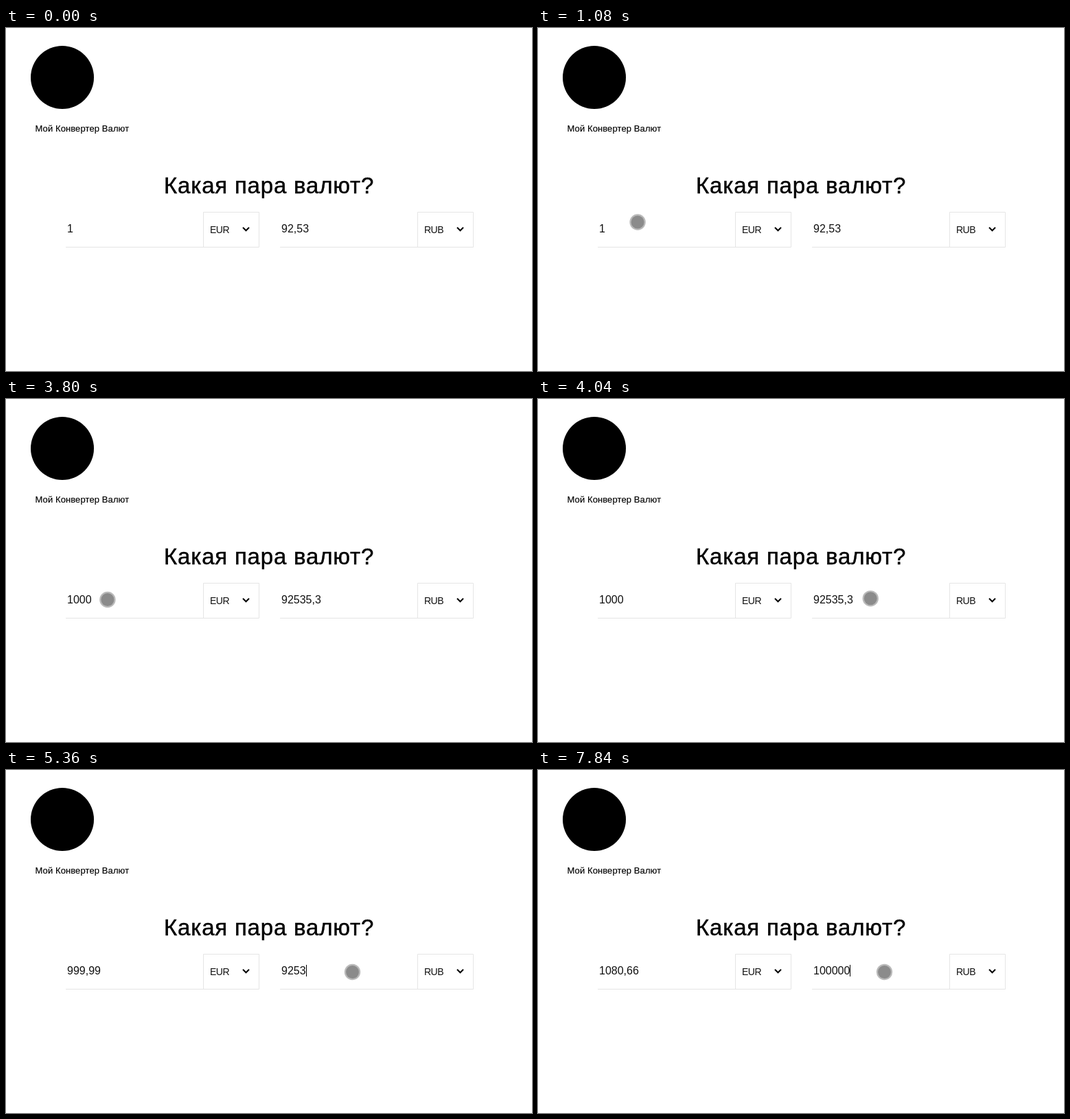
An HTML page for the animation above (8000 ms loop, 766 by 500 pixels).

```html
<!DOCTYPE html>
<html lang="ru">
<head>
<meta charset="utf-8">
<title>Конвертер</title>
<style>
  html, body { margin: 0; width: 100%; height: 100%; overflow: hidden; background: #fff; }
  svg { display: block; font: 16px "Liberation Sans", Arial, sans-serif; }
  .name { font-size: 13px; letter-spacing: .1px; stroke: #000; stroke-width: .15; }
  .title { font-size: 33px; letter-spacing: .8px; stroke: #000; stroke-width: .45; }
  .value { fill: #111; }
  .hint { fill: #d0d0d0; }
  .frame { fill: none; stroke: #e5e5e5; }
  .code { font-size: 14px; letter-spacing: -.5px; fill: #111; }
  .arrow { fill: none; stroke: #000; stroke-width: 2; }
</style>
</head>
<body>
<svg width="766" height="500" viewBox="0 0 766 500">
  <circle cx="82" cy="72" r="46"/>
  <text class="name" x="42.5" y="151">Мой Конвертер Валют</text>
  <text class="title" x="230" y="241">Какая пара валют?</text>
  <g id="fields"></g>
  <g id="pointer">
    <circle r="11.7" fill-opacity=".27"/>
    <circle r="9.5" fill-opacity=".25"/>
  </g>
</svg>
<script>
const LOOP = 8000, RATE = 92.5353, BLINK = 500, LAG = 80;
const LEFT = 0, RIGHT = 1;

// Every click or key press sets the focused field and its text.
const inputs = [];
const press = (time, field, text) => inputs.push({ time, field, text });
const type = (field, time, step, texts) =>
  texts.forEach((text, i) => press(time + i * step, field, text));
const powers = (from, to) =>
  Array.from({ length: to - from + 1 }, (_, i) => String(10 ** (from + i)));
const erase = (text, count) =>
  Array.from({ length: count }, (_, i) => text.slice(0, -1 - i));

press(1380, LEFT, '1');
press(2280, LEFT, '10');
type(LEFT, 3040, 250, powers(2, 3));
press(4720, RIGHT, '92535,3');
type(RIGHT, 5240, 55, erase('92535,3', 5));
type(RIGHT, 5800, 180, erase('92', 2));
type(RIGHT, 6480, 160, powers(0, 3));
type(RIGHT, 7520, 100, powers(4, 5));

// Pointer stops: time, x, y
const path = [
  [760, 17, 252], [1080, 145, 283], [1200, 155, 288], [1440, 146.5, 292.5],
  [3800, 146.5, 292.5], [4160, 651, 290], [4360, 513.5, 304.5], [4520, 504.5, 294.5]
];

const byId = id => document.getElementById(id);
const show = (node, on) => node.setAttribute('visibility', on ? 'visible' : 'hidden');
const inputAt = t => inputs.findLast(e => e.time <= t);

function convert({ field, text }) {
  if (!text) return '';
  const amount = parseFloat(text.replace(',', '.'));
  const result = field === LEFT ? amount * RATE : amount / RATE;
  return String(Math.floor(result * 100 + 1e-6) / 100).replace('.', ',');
}

byId('fields').innerHTML = ['EUR', 'RUB'].map((code, i) => `
  <g transform="translate(${i * 312})">
    <path class="frame" d="M87 319.5H368.5V268.5H287.5V319.5"/>
    <text class="code" x="297" y="299">${code}</text>
    <path class="arrow" d="M345 290.8l4.5 4.5 4.5-4.5"/>
    <text class="hint" x="119" y="298">Введите значение</text>
    <text class="value" x="89" y="298"></text>
    <rect class="caret" y="284" width="1" height="17"/>
  </g>`).join('');

const fields = [...byId('fields').children].map(g => ({
  hint: g.querySelector('.hint'),
  value: g.querySelector('.value'),
  caret: g.querySelector('.caret')
}));

function pointerAt(t) {
  const next = path.findIndex(p => p[0] > t);
  if (next < 0) return path.at(-1).slice(1);
  const [t0, x0, y0] = path[next - 1], [t1, x1, y1] = path[next];
  const k = (t - t0) / (t1 - t0);
  return [x0 + (x1 - x0) * k, y0 + (y1 - y0) * k];
}

function draw(t) {
  const idle = { field: LEFT, text: '1', time: -Infinity };
  const input = inputAt(t) || idle;
  const settled = inputAt(t - LAG) || idle;
  const caretOn = (t - input.time) % (2 * BLINK) < BLINK;

  fields.forEach(({ hint, value, caret }, i) => {
    const focused = i === input.field;
    // The other field follows shortly after; a new focus alone changes nothing.
    const source = settled.field === input.field ? settled : input;
    const text = focused ? input.text : convert(source);
    value.textContent = text;
    show(hint, !text);
    show(caret, focused && caretOn);
    caret.setAttribute('x', Math.round(89 + value.getComputedTextLength()));
  });

  const visible = t >= path[0][0];
  show(byId('pointer'), visible);
  if (visible) byId('pointer').setAttribute('transform', `translate(${pointerAt(t)})`);
}

const start = performance.now();
function tick() {
  draw((performance.now() - start) % LOOP);
  requestAnimationFrame(tick);
}
tick();
</script>
</body>
</html>
```
